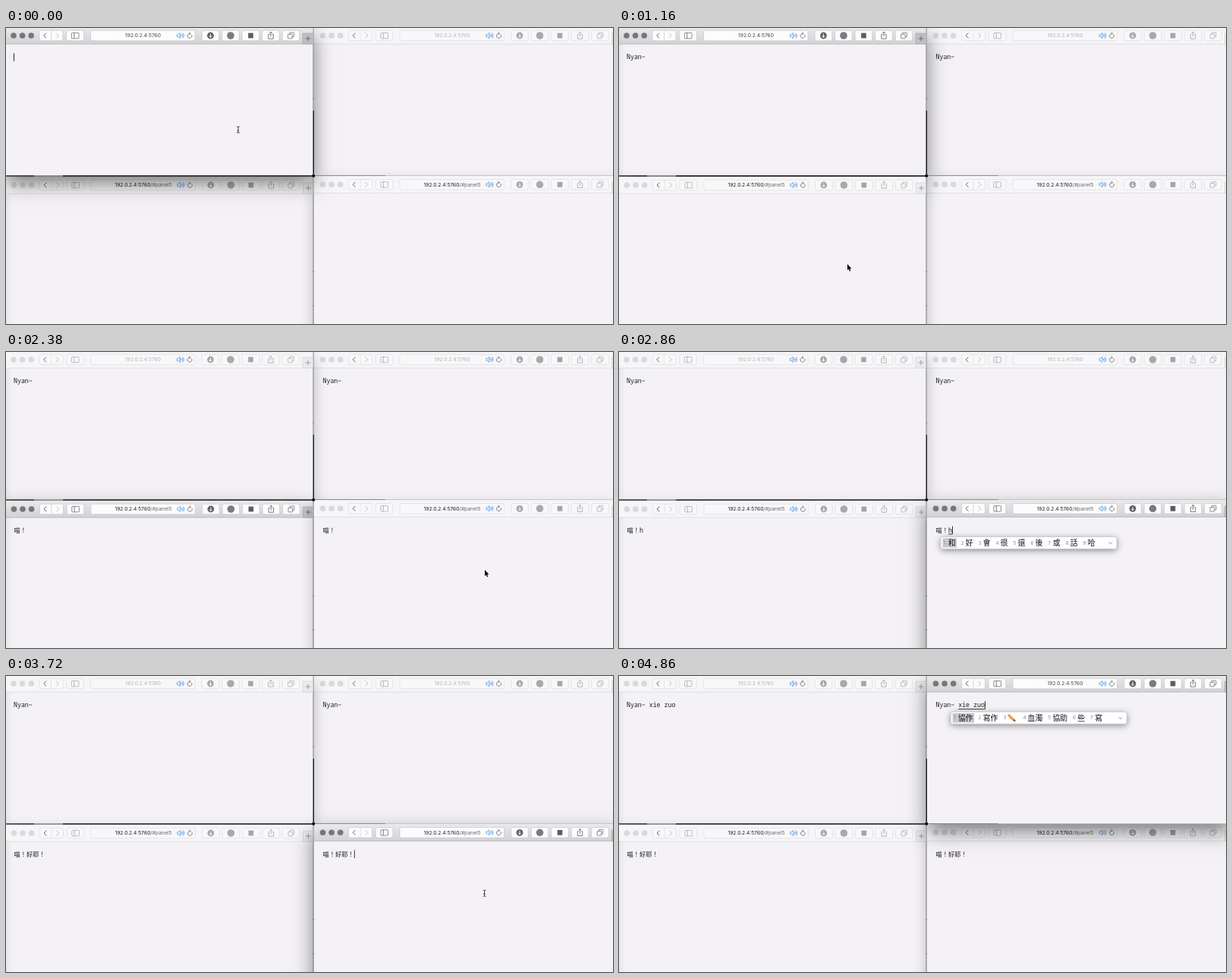
An HTML page with a canvas for the animation above (5020 ms loop, 800 px wide and 390 px high).

```html
<!DOCTYPE html>
<html lang="zh-Hant">
<head>
<meta charset="utf-8">
<title>Shared boards</title>
<style>
  html, body { margin: 0; width: 100%; height: 100%; overflow: hidden; background: #f4f2f6; }
  canvas { display: block; width: 800px; height: 390px; }
</style>
</head>
<body>
<canvas id="stage"></canvas>
<script>
const LOOP = 5020;
const canvas = document.getElementById('stage');
const dpr = window.devicePixelRatio || 1;
canvas.width = 800 * dpr;
canvas.height = 390 * dpr;
const c = canvas.getContext('2d');

const UI = 'Inter, Roboto, sans-serif';
const CANDIDATE_FONT = '500 9.8px "Noto Sans CJK TC", "Noto Sans CJK JP", "Noto Sans CJK", sans-serif';
const BOARD_FONT = '500 8.25px "Noto Sans Mono", "Noto Sans CJK SC", "Noto Sans CJK JP", "Noto Sans CJK", monospace';
const HOST = '192.0.2.4:5760', PATH = '/#panel5';

// ox, oy place the toolbar and text; x, y, w, h are the window frame
const WINDOWS = {
  TL: { x: -1, y: -1, w: 405.5, h: 195, ox: 0, oy: 0, board: 0 },
  TR: { x: 406, y: -1, w: 400, h: 195, ox: 407.5, oy: 0, board: 0 },
  BL: { x: -1, y: 196, w: 405.5, h: 240, ox: 0.4, oy: 197, board: 1 },
  BR: { x: 406, y: 195, w: 400, h: 240, ox: 407.5, oy: 196.3, board: 1 }
};
const FOCUS = [[0, 'TL'], [1200, 'BL'], [2460, 'BR'], [3960, 'TR']];
const RAISE_LEAD = 100;

// [time, committed text, text being composed, candidates]
const BOARDS = [
  [
    [0, ''], [440, 'N'], [500, 'Ny'], [560, 'Nya'], [640, 'Nyan'], [800, 'Nyan~'], [4340, 'Nyan~ '],
    [4480, 'Nyan~ ', 'x', '想 像 小 向 下 些 新 學'],
    [4540, 'Nyan~ ', 'xi', '系 係 西 習 喜 洗 細 希'],
    [4600, 'Nyan~ ', 'xie', '寫 些 謝 鞋 協 斜 血 寫'],
    [4700, 'Nyan~ ', 'xie z', '寫 些 謝 鞋 協 斜 血 寫'],
    [4780, 'Nyan~ ', 'xie zu', '寫 些 謝 鞋 協 斜 血 寫'],
    [4840, 'Nyan~ ', 'xie zuo', '協作 寫作 pencil 血濁 協助 些 寫']
  ],
  [
    [0, ''],
    [1480, '', 'm', '嗎 沒 們 媽 每 美 門 買'],
    [1560, '', 'mi', '米 迷 咪 密 蜜 秘 覓 彌'],
    [1640, '', 'mia', '咪啊 米阿 米 迷 咪 密 蜜 秘'],
    [1700, '', 'miao', '咪啊 米阿 米 迷 咪 密 蜜 秘'],
    [1740, '', 'miao', '喵 秒 妙 苗 廟 描 渺 瞄 淼'],
    [1860, '喵'], [2000, '喵！'],
    [2780, '喵！', 'h', '和 好 會 很 還 後 或 話 哈'],
    [2880, '喵！', 'ha', '哈 蛤 鉿 還 海 好 號 害 嗨'],
    [2980, '喵！', 'hao', '好 hand 號 豪 浩 壕 耗 郝 昊'],
    [3240, '喵！', 'hao y', '好 hand 號 豪 浩 壕 耗 郝 昊'],
    [3320, '喵！', 'hao ye', '好耶 好也 好 號 豪 浩 壕 耗'],
    [3480, '喵！好耶'], [3640, '喵！好耶！']
  ]
];

const CARET = [[0, 1], [20, 1], [240, 0], [400, 0], [460, 1], [960, 1], [1140, 0], [1280, 0], [1340, 1],
  [2040, 1], [2240, 0], [2480, 0], [2560, 1], [3700, 1], [3880, 0], [4080, 0], [4180, 1]];

// [time, x, y, shape until the next entry]
const POINTER = [
  [0, 306, 134, 'beam'], [440, 306, 134, ''], [960, 306, 134, 'beam'], [1040, 304, 190, 'arrow'],
  [1160, 301, 311, 'arrow'], [1240, 301, 314, 'beam'], [1460, 301, 314, ''],
  [2040, 301, 314, 'beam'], [2120, 350, 310, 'arrow'], [2360, 631, 287, 'arrow'],
  [2480, 631, 287, 'beam'], [2760, 631, 287, ''],
  [3720, 631, 287, 'beam'], [3800, 600, 230, 'arrow'], [3940, 510, 70, 'beam'],
  [4060, 499, 57, 'beam'], [4200, 495, 53, 'beam'], [4340, 495, 53, '']
];

const indexAt = (keys, t) => keys.findLastIndex(k => k[0] <= t);
const stepAt = (keys, t) => keys[indexAt(keys, t)];
function valueAt(keys, t, column = 1) {
  const i = indexAt(keys, t), a = keys[i], b = keys[i + 1] || a;
  const p = b === a ? 0 : (t - a[0]) / (b[0] - a[0]);
  return a[column] + (b[column] - a[column]) * p;
}

function rect(x, y, w, h, fill) {
  c.fillStyle = fill;
  c.fillRect(x, y, w, h);
}
function box(x, y, w, h, r, fill, stroke) {
  c.beginPath();
  c.roundRect(x, y, w, h, r);
  if (fill) { c.fillStyle = fill; c.fill(); }
  if (stroke) { c.strokeStyle = stroke; c.lineWidth = 0.7; c.stroke(); }
}
function dot(x, y, r, fill) {
  c.beginPath();
  c.arc(x, y, r, 0, 7);
  c.fillStyle = fill;
  c.fill();
}
function line(color, width, ...points) {
  c.beginPath();
  points.forEach(([x, y]) => c.lineTo(x, y));
  c.strokeStyle = color;
  c.lineWidth = width;
  c.stroke();
}
function text(s, x, y, font, fill) {
  c.font = font;
  c.fillStyle = fill;
  c.fillText(s, x, y);
  return c.measureText(s).width;
}
function shadow(alpha = 0, blur = 0, dy = 0) {
  c.shadowColor = `rgba(0,0,0,${alpha})`;
  c.shadowBlur = blur * dpr;
  c.shadowOffsetY = dy * dpr;
}
function fade(x0, y0, x1, y1, from, to) {
  const g = c.createLinearGradient(x0, y0, x1, y1);
  g.addColorStop(0, from);
  g.addColorStop(1, to);
  return g;
}

function drawAddress(active, board) {
  c.textBaseline = 'middle';
  const font = `6.7px ${UI}`;
  c.font = font;
  const path = board ? PATH : '';
  const x = 180.5 - c.measureText(HOST + path).width / 2;
  const w = text(HOST, x, 10.4, font, board ? '#1c1c1e' : active ? '#454447' : '#b3b2b5');
  text(path, x + w, 10.4, font, '#68676a');

  c.beginPath();
  c.moveTo(225.5, 8.6); c.lineTo(227, 8.6); c.lineTo(229.4, 6.4);
  c.lineTo(229.4, 13.6); c.lineTo(227, 11.4); c.lineTo(225.5, 11.4);
  c.closePath();
  c.strokeStyle = '#4b93e8';
  c.lineWidth = 0.8;
  c.stroke();
  for (const r of [1.5, 3.2, 4.9]) {
    c.beginPath();
    c.arc(229.5, 10, r, -0.8, 0.8);
    c.stroke();
  }
  c.beginPath();
  c.arc(242, 10.3, 3, -0.6, 4.8);
  c.strokeStyle = '#69686b';
  c.stroke();
  line('#69686b', 0.8, [241.2, 5.6], [243.2, 7.2], [241.2, 8.8]);
}

function drawToolbar(active, board) {
  const button = active ? '#fcfcfc' : '#f8f7f9';
  const edge = active ? '#c9c8ca' : '#dfdee0';
  const icon = active ? '#5d5c5f' : '#a5a4a7';

  for (const x of [10, 21.6, 33.2]) dot(x, 10, 3.8, active ? '#777679' : '#dad9db');
  box(44, 3.2, 31, 13.6, 2, button, edge);
  line(edge, 0.7, [59.5, 3.2], [59.5, 16.8]);
  line('#68676a', 1, [53, 6.6], [49.6, 10], [53, 13.4]);
  line('#c2c1c4', 1, [66, 6.6], [69.4, 10], [66, 13.4]);
  box(79.8, 3.2, 22.6, 13.6, 2, button, edge);
  box(86.4, 6.4, 9.6, 7.4, 0.8, null, icon);
  line(icon, 0.8, [89.8, 6.4], [89.8, 13.8]);
  box(111.5, 3.2, 137.5, 13.6, 2, button, edge);
  drawAddress(active, board);

  for (const x of [269.5, 296, 322.5, 349, 375.5]) box(x - 11.3, 3.2, 22.6, 13.6, 2, button, edge);
  dot(269.5, 10, 4.4, icon);
  line('#fff', 1, [269.5, 7.4], [269.5, 12.4]);
  line('#fff', 1, [267.5, 10.4], [269.5, 12.5], [271.5, 10.4]);
  dot(296, 10, 4.8, active ? '#7b7a7d' : '#a9a8ab');
  rect(319.2, 6.6, 6.6, 6.8, icon);

  line(icon, 0.8, [347.4, 8.4], [345.8, 8.4], [345.8, 14.2], [352.2, 14.2], [352.2, 8.4], [350.6, 8.4]);
  line(icon, 0.8, [349, 11.4], [349, 5.2]);
  line(icon, 0.8, [347.2, 6.8], [349, 5], [350.8, 6.8]);
  box(373.8, 6, 5.6, 5.6, 0.5, null, icon);
  box(371.6, 8.2, 5.6, 5.6, 0.5, button, icon);

  box(391, 7, 16, 14, 0, active ? '#bfbec0' : '#ebeaec', active ? '#a9a8aa' : '#d3d2d4');
  const plus = active ? '#58575a' : '#8e8d90';
  line(plus, 0.8, [394.6, 14], [401.4, 14]);
  line(plus, 0.8, [398, 10.6], [398, 17.4]);
}

function drawEmoji(kind, x, y) {
  c.save();
  c.translate(x + 6, y);
  if (kind === 'pencil') {
    c.rotate(0.76);
    rect(-4.5, -1.6, 8, 3.2, '#f5b32b');
    rect(-4.5, 0.5, 8, 1.1, '#cf8420');
    rect(-6.6, -1.6, 2.1, 3.2, '#e48b8b');
    c.beginPath();
    c.moveTo(3.5, -1.6); c.lineTo(6.8, 0); c.lineTo(3.5, 1.6);
    c.fillStyle = '#493b2e';
    c.fill();
  } else {
    c.lineCap = 'round';
    line('#efb72b', 1.7, [0, 1], [0.3, -4.2]);
    line('#f6c944', 1.7, [1.8, 1], [2.6, -2.6]);
    line('#efb72b', 1.7, [-1.6, 1], [-1.4, -2.2]);
    c.beginPath();
    c.ellipse(0, 2, 4, 3.4, 0, 0, 7);
    c.fillStyle = '#f4c136';
    c.fill();
    dot(-1, 1.4, 1.1, '#fff3cf');
  }
  c.restore();
}

function drawCandidates(list, x, y) {
  shadow(0.45, 8, 2);
  box(x, y, 232, 16, 2.5, '#fff');
  shadow();
  box(x, y, 232, 16, 2.5, null, '#c4c3c6');
  c.textBaseline = 'middle';
  const mid = y + 8.2;
  let left = x + 3.6;
  list.split(' ').forEach((word, i) => {
    const emoji = word === 'hand' || word === 'pencil';
    const width = emoji ? 12.8 : word.length * 9.8;
    if (!i) rect(x + 2.5, y + 1.8, width + 8.8, 12.4, '#c9c8cb');
    text(i + 1, left, mid, `6.6px ${UI}`, '#8c8b8e');
    if (emoji) drawEmoji(word, left + 5.5, mid);
    else text(word, left + 6.2, mid, CANDIDATE_FONT, '#111');
    left += 13.2 + width;
  });
  line('#88878a', 0.9, [x + 221.2, y + 7], [x + 223.7, y + 9.4], [x + 226.2, y + 7]);
}

function drawBoard(t, win, active) {
  const [, done, composing = '', candidates] = stepAt(BOARDS[win.board], t);
  const x = win.ox + 10, y = win.oy + 41.2;
  c.textBaseline = 'alphabetic';
  const start = x + text(done, x, y, BOARD_FONT, '#1d1d1f');
  const end = start + text(composing, start, y, BOARD_FONT, '#1d1d1f');
  if (!active) return;
  c.globalAlpha = valueAt(CARET, t);
  rect(end + 0.1, y - 8, 0.9, 10.5, '#111');
  c.globalAlpha = 1;
  if (composing) {
    rect(start, y + 2, end - start, 0.9, '#222');
    drawCandidates(candidates, start - 10, win.oy + 47.2);
  }
}

function drawWindow(t, name, active, top) {
  const win = WINDOWS[name];
  const { x, y, w, h, ox, oy } = win;
  const bar = oy + 21;
  if (active) shadow(0.5, 25, 11);
  else shadow(0.25, 17, 8);
  rect(x, y, w, h, '#f4f2f6');
  shadow();

  c.save();
  c.beginPath();
  c.rect(x, y, w, h);
  c.clip();
  rect(x, y, w, bar - y, active ? fade(0, y, 0, bar, '#eae9eb', '#d2d1d3') : '#f6f5f7');
  rect(x, bar - 0.3, w, 0.8, active ? '#b5b4b6' : '#dcdbdd');
  c.save();
  c.translate(ox, oy);
  drawToolbar(active, win.board);
  c.restore();
  if (x < 0 && !top) rect(0, bar, 9, h, fade(0, 0, 9, 0, 'rgba(0,0,0,.05)', 'rgba(0,0,0,0)'));
  c.restore();
  drawBoard(t, win, active);
}

function drawSeams() {
  rect(0, 194.4, 37, 1, '#29282b');
  rect(37, 194.4, 38, 1, '#aaa9ac');
  rect(75, 194.4, 331, 1, '#0c0c0e');
  rect(406, 194, 94, 1, '#8a898d');
  rect(500, 194, 300, 1, '#c6c5c8');
  rect(404.8, 0, 1.1, 109, '#b0afb2');
  rect(404.8, 109, 1.1, 86, '#09090b');
  rect(404.8, 196, 1.1, 194, '#adacaf');
  for (const y of [92, 320, 365]) rect(404.8, y, 1.1, 2, '#77767a');
  dot(405.3, 194.8, 2, '#09090b');
}

function drawPointer(t) {
  const shape = stepAt(POINTER, t)[3];
  if (!shape) return;
  c.save();
  c.translate(valueAt(POINTER, t, 1), valueAt(POINTER, t, 2));
  if (shape === 'beam') {
    for (const [color, width] of [['#fff', 2], ['#222', 0.9]]) {
      line(color, width, [-1.9, -4.3], [0, -3.5], [1.9, -4.3]);
      line(color, width, [0, -3.5], [0, 3.5]);
      line(color, width, [-1.9, 4.3], [0, 3.5], [1.9, 4.3]);
      line(color, width, [-1.2, 1], [1.2, 1]);
    }
  } else {
    c.beginPath();
    [[0, 0], [0, 8.2], [1.8, 6.6], [3, 9.6], [4.3, 9], [3.1, 6.2], [5.5, 6]].forEach(p => c.lineTo(...p));
    c.closePath();
    c.strokeStyle = '#fff';
    c.lineWidth = 1.4;
    c.stroke();
    c.fillStyle = '#000';
    c.fill();
  }
  c.restore();
}

function draw(t) {
  c.setTransform(dpr, 0, 0, dpr, 0, 0);
  rect(0, 0, 800, 390, '#b0afb2');
  const focused = stepAt(FOCUS, t)[1];
  let order = ['BL', 'TR', 'BR', 'TL'];
  for (const [time, name] of FOCUS) {
    if (time - RAISE_LEAD <= t) order = [...order.filter(n => n !== name), name];
  }
  order.forEach((name, i) => drawWindow(t, name, name === focused, i === 3));
  drawSeams();
  drawPointer(t);
}

function tick() {
  draw(performance.now() % LOOP);
  requestAnimationFrame(tick);
}
tick();
</script>
</body>
</html>
```
